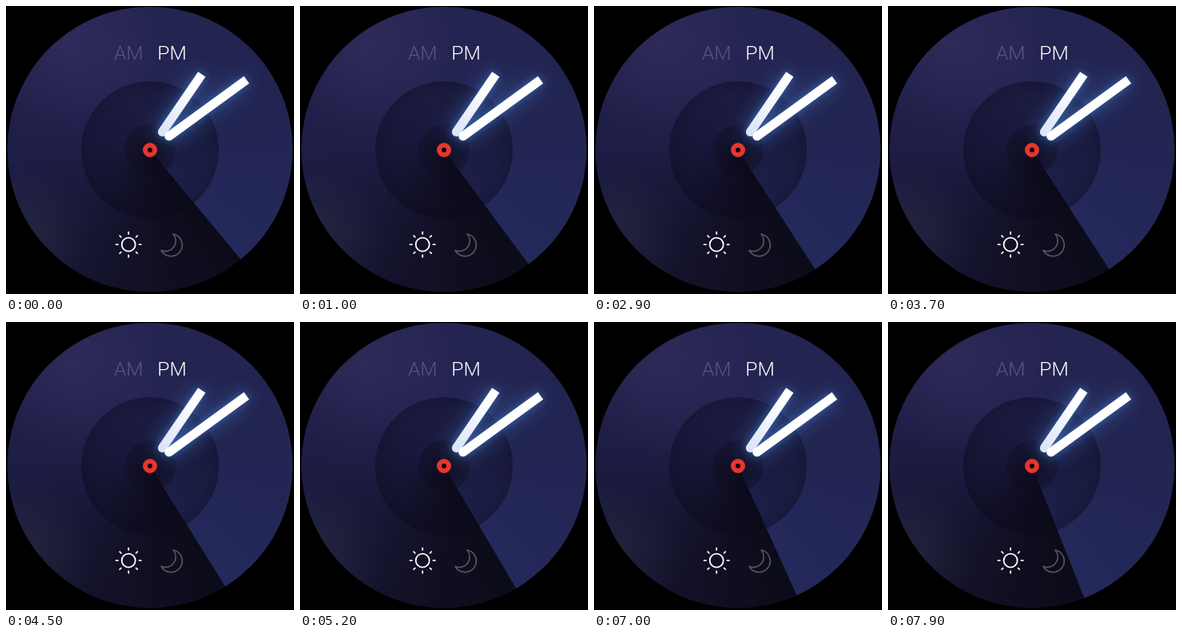
These frames come from a looping animation (360 px wide and 360 px high, 8 s). An HTML page:

```html
<!DOCTYPE html>
<html lang="en">
<head>
<meta charset="utf-8">
<title>Clock face</title>
<style>
html, body { margin: 0; width: 100%; height: 100%; overflow: hidden; background: #000; }
#dial, svg { position: absolute; left: 0; top: 0; width: 360px; height: 360px; }
#dial { clip-path: circle(178.3px at 180px 179.2px); }
text { font: 300 24.6px Roboto, sans-serif; }
</style>
</head>
<body>
<div id="dial"></div>
<svg viewBox="0 0 360 360" fill="none">
  <defs>
    <radialGradient id="disc">
      <stop offset=".4" stop-color="#0a081c" stop-opacity=".32"/>
      <stop offset=".8" stop-color="#0a081c" stop-opacity=".34"/>
      <stop offset="1" stop-color="#0a081c" stop-opacity=".48"/>
    </radialGradient>
    <radialGradient id="core">
      <stop offset=".4" stop-color="#0d0b1c" stop-opacity=".6"/>
      <stop offset="1" stop-color="#0d0b1c" stop-opacity=".35"/>
    </radialGradient>
    <linearGradient id="shade" x1="0" y1="153" x2="0" y2="66" gradientUnits="userSpaceOnUse">
      <stop stop-color="#dce4f6"/>
      <stop offset=".8" stop-color="#fff"/>
    </linearGradient>
    <filter id="wide" filterUnits="userSpaceOnUse" x="0" y="0" width="360" height="360"><feGaussianBlur stdDeviation="14"/></filter>
    <filter id="tight" filterUnits="userSpaceOnUse" x="0" y="0" width="360" height="360"><feGaussianBlur stdDeviation="5"/></filter>
    <path id="hour" d="M-5.6 65.4H5.6V152.6A5.6 5.6 0 0 1 -5.6 152.6Z" transform="rotate(34.4 180 180) translate(180 0)"/>
    <path id="minute" d="M-5.6 30.8H5.6V150.6A5.6 5.6 0 0 1 -5.6 150.6Z" transform="rotate(54 180 180) translate(180 0)"/>
    <g id="hands"><use href="#hour"/><use href="#minute"/></g>
  </defs>

  <circle cx="180" cy="180" r="86" fill="url(#disc)"/>
  <circle cx="180" cy="180" r="32" fill="url(#core)"/>

  <text x="135" y="67" fill="#57567a">AM</text>
  <text x="189.3" y="67" fill="#fff">PM</text>

  <use href="#hands" fill="#3f78c8" opacity=".7" filter="url(#wide)"/>
  <use href="#hands" fill="#4a86dc" opacity=".55" filter="url(#tight)"/>
  <use href="#hour" fill="url(#shade)"/>
  <use href="#minute" fill="#fff"/>
  <circle cx="180" cy="180" r="6" fill="#08060c" stroke="#e8352e" stroke-width="6"/>

  <g id="sun" stroke="#fff" stroke-width="1.8" stroke-linecap="round">
    <circle cx="153.2" cy="298.2" r="8.5"/>
  </g>
  <path d="M209 285A14 14 0 1 1 194 305.5A13 13 0 0 0 209 285Z" stroke="#55545f" stroke-width="1.7" stroke-linejoin="round"/>
</svg>
<script>
const LOOP = 8000, STEP = 100;
// [time in ms, sweep angle in degrees]
const keys = [[0, 140.5], [1000, 143.7], [1800, 147.3], [4400, 147.3], [4500, 148.2],
  [4700, 148.2], [4800, 149], [4900, 149], [5200, 149.7], [6200, 153.2], [7900, 158.6]];
const dial = document.getElementById('dial');
const sun = document.getElementById('sun');

for (let i = 0; i < 8; i++) {
  const ray = document.createElementNS('http://www.w3.org/2000/svg', 'path');
  ray.setAttribute('d', 'M166.5 298.2h2.3');
  ray.setAttribute('transform', `rotate(${i * 45} 153.2 298.2)`);
  sun.append(ray);
}

function sweepAt(t) {
  const i = keys.findIndex(k => k[0] >= t);
  if (i < 1) return keys[0][1];
  const [t0, a] = keys[i - 1], [t1, b] = keys[i];
  return a + (b - a) * (t - t0) / (t1 - t0);
}

function draw(now) {
  const t = Math.floor(now % LOOP / STEP) * STEP;
  // Soft lights on the lower left rim and the upper left, over the sweep
  dial.style.background = `radial-gradient(circle at 20px 290px, #3038486b, #30384800 90px),
    radial-gradient(circle at 80px 50px, #40386a66, #40386a00 110px),
    conic-gradient(from ${sweepAt(t)}deg at 180px 180px, #0c0b19 0deg, #100f22 35deg,
      #181736 85deg, #1e1e47 130deg, #252452 200deg, #222450 280deg, #24295b 359.6deg, #0c0b19 360deg)`;
  requestAnimationFrame(draw);
}
draw(0);
</script>
</body>
</html>
```
